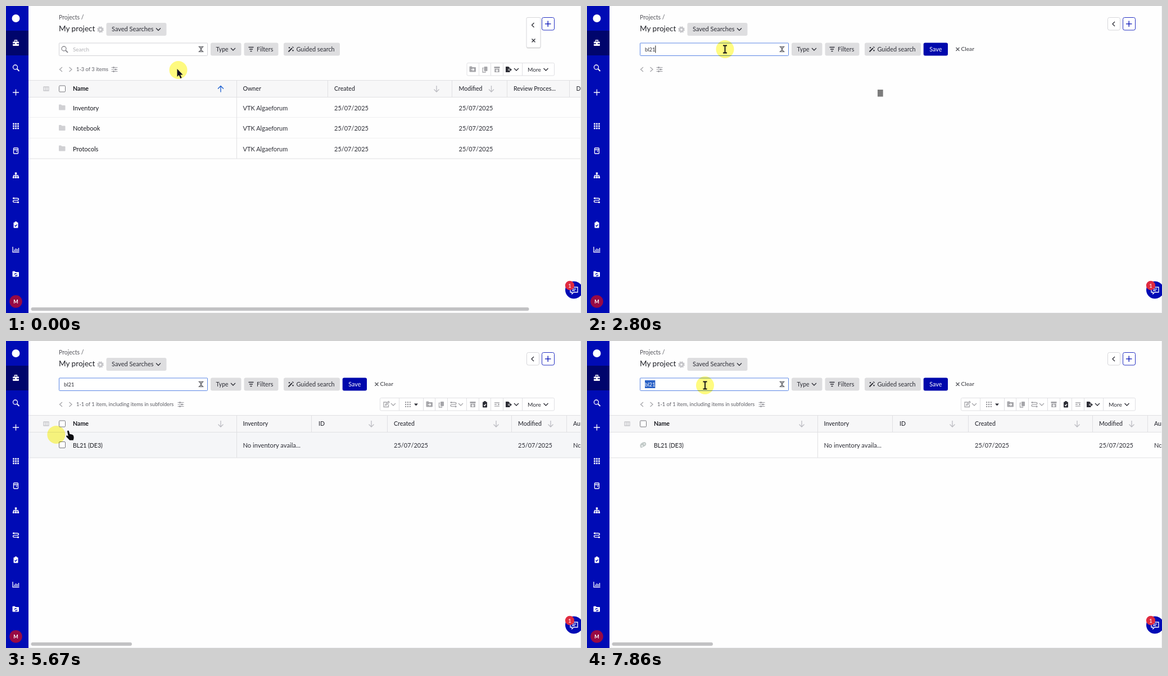
Recreate the animation shown at these times as an HTML page. Size 1023 px wide and 547 px high, loop 8000 ms.

```html
<!DOCTYPE html>
<html lang="en">
<head>
<meta charset="utf-8">
<title>Project search</title>
<style>
html, body { margin: 0; width: 100%; height: 100%; overflow: hidden; background: #fefefe; }
svg { display: block; width: 100vw; height: 100vh; font-family: Lato, "Open Sans", sans-serif; }
text { white-space: pre; }
.ln { fill: none; stroke-width: 1.3; }
</style>
</head>
<body>
<svg id="stage" viewBox="0 0 1023 547"></svg>
<script>
const BLUE = '#000bb5', INK = '#2c2d35', GREY = '#a6a6aa', RULE = '#e0e0e3', SOFT = '#f0f0f2';

// Drawing helpers, each returning SVG markup
const text = (x, y, size, str, fill = INK, extra = '') =>
  `<text x="${x}" y="${y}" font-size="${size}" fill="${fill}" ${extra}>${str}</text>`;
const box = (x, y, w, h, fill, extra = '') =>
  `<rect x="${x}" y="${y}" width="${w}" height="${h}" fill="${fill}" ${extra}/>`;
const line = (d, stroke = INK, extra = '') => `<path class="ln" d="${d}" stroke="${stroke}" ${extra}/>`;
const shape = (d, fill, extra = '') => `<path d="${d}" fill="${fill}" ${extra}/>`;
const dot = (x, y, r, fill) => `<circle cx="${x}" cy="${y}" r="${r}" fill="${fill}"/>`;
const at = (x, y, body) => `<g transform="translate(${x} ${y})">${body}</g>`;
const group = (id, body) => `<g id="${id}">${body}</g>`;
const chevron = (x, y, c = INK) => line(`M${x - 4} ${y - 2}l4 4 4-4`, c, 'stroke-width="1.5"');
const button = (x, w, body, y = 65.5) => box(x, y, w, 23, '#dedee0', 'rx="3"') + body;
const checkbox = y => box(94.5, y, 11, 11, '#fff', 'rx="1.5" stroke="#77777c"');
const vline = (x, y1, y2) => line(`M${x} ${y1}V${y2}`, RULE, 'style="stroke-width:1"');
const hline = (y, c = RULE) => line(`M40 ${y}H1023`, c, 'style="stroke-width:1"');
const sortArrow = (x, up) => up
  ? line(`M${x} 153.500V142.500m-5 5l5-5 5 5`, '#1d5fd0')
  : line(`M${x} 142V153m-4.500-4.500l4.500 4.500 4.500-4.500`, '#bcbcc2');

// Icons centred on 0,0
const icon = {
  folder: c => shape('M-6-4.500q0-1 1-1h3l1.500 1.500h5q1 0 1 1v6.500q0 1-1 1h-9.500q-1 0-1-1z', c),
  move: c => icon.folder(c) + line('M-3 .3h5m-2-2l2 2-2 2', '#fff'),
  copy: c => box(-1.5, -5, 6, 8, c, 'rx="1"') + line('M-2.500-2.500h-1.500v7.500h5v-1.500', c),
  archive: c => box(-5, -5, 10, 3, c) + box(-4.3, -1.2, 8.6, 6.2, c) + line('M0-.500v4m-2-1.800l2 2 2-2', '#fff'),
  exporter: c => shape('M-5-5h5l2.500 2.500v1.500h-3v3h3v3h-7.500z', c) + line('M0 .5h5m-2-2l2 2-2 2', c),
  edit: c => line('M1-4h-5.500v8.500h8.500v-4.500M-1.500 1.500l.5-2 5-5 1.500 1.500-5 5z', c),
  route: c => line('M-4.500-3.500h7q2.500 0 2.500 1.800t-2.500 1.800h-5q-2.500 0-2.500 1.800t2.500 1.800h5', c) +
    dot(-4, -3.5, 1.6, c) + dot(4, 3.7, 1.6, c),
  clipboard: (c, tick) => box(-4, -4.5, 8, 10, c, 'rx="1"') + box(-1.8, -6, 3.6, 3, c, 'rx="1"') +
    line('M-2 1l1.500 1.500 2.500-3', tick),
  list: c => line('M-4.500-3h9M-4.500 0h4m2 0h3M-4.500 3.200h9M2.500-1.500v3', c),
  sliders: c => line('M-5.500-3.500h11M-5.500 0h11M-5.500 3.500h11', c, 'style="stroke-width:1"') +
    dot(-1.5, -3.5, 1.6, c) + dot(2, 0, 1.6, c) + dot(-1.5, 3.5, 1.6, c),
  grid: (c, step, s) => [-1, 0, 1].flatMap(i => [-1, 0, 1].map(j =>
    box(i * step - s / 2, j * step - s / 2, s, s, c))).join(''),
  magnifier: c => `<circle cx="-1" cy="-1" r="4" class="ln" stroke="${c}"/>` + line('M2 2l4 4', c, 'style="stroke-width:1.8"'),
  columns: c => box(-4.5, -3.5, 9, 7, 'none', `stroke="${c}"`) + line('M-1.500-3.500v7M1.500-3.500v7', c, 'style="stroke-width:1"'),
  gear: c => `<circle r="3.200" fill="none" stroke="${c}" stroke-width="3"/>` +
    `<circle r="5" fill="none" stroke="${c}" stroke-width="1.800" stroke-dasharray="2 1.927"/>`
};

function sidebar() {
  const w = '#fff', active = '#00056c';
  const items = [
    [66, box(-5.5, -2.5, 11, 7.5, w, 'rx="1"') + line('M-2-2.500v-2.500h4v2.500', w) + line('M-5.500 1h4m3 0h4', active)],
    [110, icon.magnifier(w)],
    [154, line('M-5.500 0h11M0-5.500v11', w)],
    [214, icon.grid(w, 4, 2.7)],
    [258, box(-4, -5, 8, 10, 'none', `rx="1" stroke="${w}" stroke-width="1.300"`) + line('M-4-2h8M1.500-.500v2.500', w)],
    [302, box(-1.7, -5.5, 3.4, 3.4, w) + line('M0-2v5M-4 2v-2h8v2', w) + [-4, 0, 4].map(x => box(x - 1.6, 1.8, 3.2, 3.2, w)).join('')],
    [346, icon.route(w)],
    [390, icon.clipboard(w, BLUE)],
    [434, line('M-5.500-5v9.500h11.500M-2.500 3v-3M0 3v-5M2.500 3v-4M5 3v-6', w)],
    [478, icon.folder(w) + line('M-2.500 .5q1-2.500 4-1.500M2.500 1q-1 2.500-4 1.500', BLUE)]
  ];
  return box(0, 0, 40, 547, BLUE) + box(0, 44, 40, 44, active) + dot(17.5, 22, 7, w) +
    items.map(([y, body]) => at(17.5, y, body)).join('') +
    dot(17.5, 526.5, 11.3, '#980a44') +
    text(17.5, 530, 9, 'M', w, 'text-anchor="middle" font-weight="700"');
}

function topBar() {
  const wand = line('M-4.500 4.500l6.500-6.500', INK, 'style="stroke-width:2"') +
    line('M2.500-4.500l2 2M-3-4v2.500m-1.200-1.200h2.500M3.500 1v2.500m-1.200-1.200h2.500');
  return text(94, 23.5, 10.5, 'Projects /', '#55565c') + text(94, 44.8, 13.6, 'My project', '#1f2027') +
    at(168, 42, icon.gear('#c4c4c8')) +
    button(178.5, 107, text(188, 45.3, 11, 'Saved Searches') + chevron(271, 41.5), 30) +
    button(364, 54.5, text(373.5, 80.8, 10.5, 'Type') + chevron(404, 77)) +
    button(423.5, 61, line('M431.500 73.500h9M433 77h6M434.500 80.500h3') + text(446, 80.8, 10.8, 'Filters')) +
    button(494, 100, at(507, 77, wand) + text(516.5, 80.8, 10.9, 'Guided search')) +
    box(953.5, 20.5, 22, 22.5, '#fff', 'rx="3" stroke="#2430c2"') +
    line('M959 31.800h10.500M964.200 26.500v10.500', BLUE) +
    line('M100 109l-4.500 4 4.500 4M112.500 109l4.500 4-4.500 4', GREY) +
    group('backButton', box(926.5, 20.5, 22, 22.5, '#fff', 'rx="3" stroke="#d6d6da"') + line('M939 28l-4 4 4 4')) +
    group('panel', box(926, 21, 25.5, 55, '#000', 'rx="3" opacity=".1"') +
      box(926, 20.5, 25, 53.5, '#fff', 'rx="2" stroke="#c6c6ca" stroke-width=".7"') +
      line('M939.500 30l-4 4 4 4M935.500 58.500l6 6m0-6l-6 6'));
}

function searchField() {
  const glass = line('M-4.500-4.500h9M-4.500 4.500h9M-3-4l6 8M3-4l-6 8M-2-2.500h4M-2 2.500h4', '#44454b', 'style="stroke-width:1"');
  return box(94.5, 66, 264, 22.5, '#fff', 'id="field" rx="1"') +
    group('hint', at(104, 77, icon.magnifier('#88888e')) + text(119, 80.8, 9.9, 'Search', '#b2b2b6')) +
    box(103, 70, 17.5, 14, '#2b62c6', 'id="mark"') +
    text(103, 80.8, 9.4, '', INK, 'id="query"') +
    box(0, 70.5, 1, 13, '#111', 'id="caret"') + at(347, 77, glass) +
    group('saveBar', box(598.7, 65.5, 43.3, 23, '#0008ac', 'rx="3"') +
      text(620.3, 80.8, 10.8, 'Save', '#fff', 'text-anchor="middle"') +
      line('M656.500 74l6 6m0-6l-6 6', '#55565c') + text(665.5, 80.4, 10.2, 'Clear', '#44454b', 'font-weight="500"'));
}

const toolbar = (left, dividers, icons) =>
  box(left + 0.5, 101.5, 975 - left, 22.5, '#fff', `rx="2" stroke="${RULE}"`) +
  dividers.map(x => vline(x, 102, 124)).join('') +
  icons.map(([x, body]) => at(x, 113, body)).join('') +
  chevron(908, 113) + text(928, 116.6, 10.2, 'More') + chevron(960.5, 113);

// cols: [text x, label, line after it, sort arrow x]
const header = (cols, bottom, up) =>
  box(40, 132.5, 983, 30, '#f7f7f8') + hline(132.5) + hline(162.5) +
  at(71.5, 147.5, icon.columns('#b5b5ba')) + checkbox(142) +
  text(119, 151.3, 10.6, 'Name', '#15161c', 'font-weight="700"') + sortArrow(382, up) +
  vline(410.5, 133, bottom) + hline(bottom) +
  cols.map(([x, label, end, arrow]) => text(x, 151.3, 10.6, label, INK, 'font-weight="500"') +
    (end ? vline(end, 133, 162) : '') + (arrow ? sortArrow(arrow) : '')).join('');

function folderTable() {
  const rows = ['Inventory', 'Notebook', 'Protocols'].map((name, i) => {
    const y = 185.7 + i * 36.5;
    return at(100, y - 4.7, icon.folder('#d0d0d3')) + text(119, y, 11, name, '#15161c') +
      text(421.5, y, 11, 'VTK Algaeforum') + text(584, y, 11, '25/07/2025') + text(805.5, y, 11, '25/07/2025');
  }).join('');
  return hline(198.5, SOFT) + hline(235.5, SOFT) +
    header([[421.5, 'Owner', 572.5], [584, 'Created', 793.5, 766], [805.5, 'Modified', 891.5, 863.5],
      [903, 'Review Proces...', 1002.5], [1014.5, 'Details']], 272, true) + rows +
    toolbar(819.5, [841.5, 862.5, 884.5, 918.5], [[830.5, icon.move(GREY)], [852, icon.copy(GREY)],
      [873.5, icon.archive(GREY)], [894, icon.exporter(INK)]]) +
    box(44.5, 537, 886, 6, '#c2c2c4', 'rx="3"');
}

function resultTable() {
  const y = 189.7;
  const cell = shape('M-5.500 2q-1-4 4-6.500t6.500 1-3.500 6-6 2.500z', '#c3cbc9') + dot(-2, 1.5, 1.2, '#fff') + dot(2, -2, 1, '#fff');
  return box(40, 163, 983, 45, '#f5f6f8', 'id="rowShade"') +
    header([[421.5, 'Inventory', 543.5], [556, 'ID', 678.5, 650], [690, 'Created', 899.5, 872],
      [911, 'Modified', 997.5, 969], [1009, 'Author']], 208, false) +
    group('rowIcon', at(100, 185.5, cell)) + group('rowCheck', checkbox(179.5)) +
    text(119, y, 10.5, 'BL21 (DE3)', '#15161c') + text(421.5, y, 11.2, 'No inventory availa...') +
    text(690, y, 11, '25/07/2025') + text(911, y, 11, '25/07/2025') + text(1009, y, 11, 'Noa') +
    toolbar(665, [699.5, 742.5, 763.5, 785.5, 819.5, 841.5, 862.5, 884.5, 918.5], [
      [676.5, icon.edit(GREY)], [715, icon.grid('#88888e', 3.8, 2)], [729.5, shape('M-3.500-1.500h7l-3.500 4z', INK)],
      [753.5, icon.move(GREY)], [774.5, icon.copy(GREY)], [796, icon.route(GREY)], [830.5, icon.archive(GREY)],
      [852, icon.clipboard(INK, '#fff')], [873.5, icon.list(GREY)], [894, icon.exporter(INK)]]) +
    chevron(689, 113, GREY) + chevron(809, 113, GREY) +
    box(44.5, 537, 179.5, 6, '#c2c2c4', 'rx="3"');
}

const chat = dot(1010.5, 506, 15.5, BLUE) +
  line('M1004 501h13v9h-7l-3 3v-3h-3zM1007 504.300h7M1007 507h5', '#fff') + dot(1003, 498, 8.2, '#e02b40') +
  text(1003, 501.6, 10, '1', '#fff', 'text-anchor="middle"');

const tooltip = box(145.5, 29, 162.5, 30.5, '#000', 'rx="3"') + shape('M221 59h11l-5.500 4.500z', '#000') +
  text(226.5, 41, 9.6, 'Please enter a minimum', '#fff', 'text-anchor="middle"') +
  text(226.5, 53, 9.6, 'of three characters', '#fff', 'text-anchor="middle"');

const pointer = group('arrow', shape('M0 0v14l3.200-3 2.600 6 2.400-1-2.600-5.600h4.400z', '#0a0a24')) +
  group('beam', line('M-3.500-6.500h2.500q1 0 1 1v11q0 1-1 1h-2.500M3.500-6.500h-2.500q-1 0-1 1M0 5.500q0 1 1 1h2.500', '#101014', 'style="stroke-width:1.9"')) +
  group('hand', shape('M-2 1q1.500-2.200 3 0l1.400 5 4.600 1 2.200 2 .5 4-1 4h-6.500l-5.700-6q-1-2 1-2.500l2.200 1.500z', '#0c0c10'));

const $ = id => document.getElementById(id);
$('stage').innerHTML = box(0, 0, 1023, 547, '#fefefe') + group('folders', folderTable()) + group('results', resultTable()) +
  [0, 1, 2].map(i => box(517 + i * 13, 149, 9.7, 12.5, '#d2d2d2', `id="load${i}"`)).join('') +
  topBar() + searchField() + text(125, 116.4, 9.3, '', '#5c5d64', 'id="count"') +
  group('sliders', icon.sliders('#9a9aa0')) + line('M1022.500 0V547', '#f0f0f3') + hline(546.5, SOFT) +
  sidebar() + chat + group('tip', tooltip) +
  '<circle id="glow" r="16" fill="#fffb80" style="mix-blend-mode:multiply"/>' + group('pointer', pointer);

// Pointer path: time, x, y
const PATH = [[60, 304.5, 112], [400, 271, 69], [610, 271, 69], [1000, 245.5, 77], [5140, 245.5, 77],
  [5350, 160, 118], [5540, 85, 160], [5610, 87, 165], [5670, 111, 159.5], [5800, 111, 185], [5940, 101, 219],
  [6140, 101, 231], [6300, 102, 241], [6500, 155, 185], [6710, 207, 103], [6770, 209, 99], [7120, 210, 79]];
const KEYS = [2280, 2410, 2540, 2740];
const FOCUS = 950, BUSY = 2740, COUNTED = 3060, DONE = 4600, SELECT = 7780, BLINK = 530;

const clamp = v => Math.max(0, Math.min(1, v));
const show = (id, on) => { $(id).style.display = on ? '' : 'none'; };
const place = (id, x, y) => $(id).setAttribute('transform', `translate(${x} ${y})`);

function pointAt(t) {
  const i = PATH.findIndex(p => p[0] > t);
  if (i < 0) return PATH[PATH.length - 1].slice(1);
  if (i === 0) return PATH[0].slice(1);
  const [a, b] = [PATH[i - 1], PATH[i]], k = (t - a[0]) / (b[0] - a[0]);
  return [a[1] + (b[1] - a[1]) * k, a[2] + (b[2] - a[2]) * k];
}

function drawField(t) {
  const focused = t >= FOCUS, selected = t >= SELECT;
  const typed = KEYS.filter(k => t >= k);
  const lastKey = typed.length ? typed[typed.length - 1] : FOCUS;
  $('field').setAttribute('stroke', focused ? '#5a86e4' : '#d2d2d6');
  show('hint', !focused);
  const query = $('query');
  query.textContent = 'bl21'.slice(0, typed.length);
  query.setAttribute('fill', selected ? '#fff' : INK);
  const width = query.getComputedTextLength();
  $('mark').setAttribute('width', width);
  show('mark', selected);
  $('caret').setAttribute('x', 103 + width);
  show('caret', focused && !selected && Math.floor((t - lastKey) / BLINK) % 2 === 0);
  $('tip').setAttribute('opacity', 0.9 * clamp((t - 2260) / 150) * clamp((2690 - t) / 150));
}

function drawLists(t) {
  show('folders', t < BUSY);
  show('results', t >= DONE);
  show('saveBar', t >= BUSY);
  $('count').textContent = t < BUSY ? '1-3 of 3 items' : t < COUNTED ? '' : '1-1 of 1 item, including items in subfolders';
  place('sliders', t < BUSY ? 193 : t < COUNTED ? 129 : 311, 113);
  for (let i = 0; i < 3; i++) {
    const age = t - 2780 - i * 140;
    const k = clamp((age > 600 ? age - 600 : age) / 300);
    const v = Math.round(118 + 92 * k);
    show('load' + i, age >= 0 && t < DONE);
    $('load' + i).setAttribute('fill', `rgb(${v},${v},${v})`);
  }
}

function drawPointer(t) {
  const [x, y] = pointAt(t), [gx, gy] = pointAt(t - 60);
  const beam = x > 94 && x < 359 && y > 66 && y < 89;
  const hover = t >= DONE && y >= 158 && y < 208;
  show('rowShade', hover);
  show('rowCheck', hover);
  show('rowIcon', !hover);
  show('beam', beam);
  show('hand', hover);
  show('arrow', !beam && !hover);
  place('pointer', x, y);
  const shift = beam ? 0 : 2;
  place('glow', gx + shift, gy + shift);
}

function frame(now) {
  const t = now % 8000;
  show('panel', t < 740);
  show('backButton', t >= 740);
  drawField(t);
  drawLists(t);
  drawPointer(t);
}

const start = performance.now();
(function tick() {
  frame(performance.now() - start);
  requestAnimationFrame(tick);
})();
</script>
</body>
</html>
```
